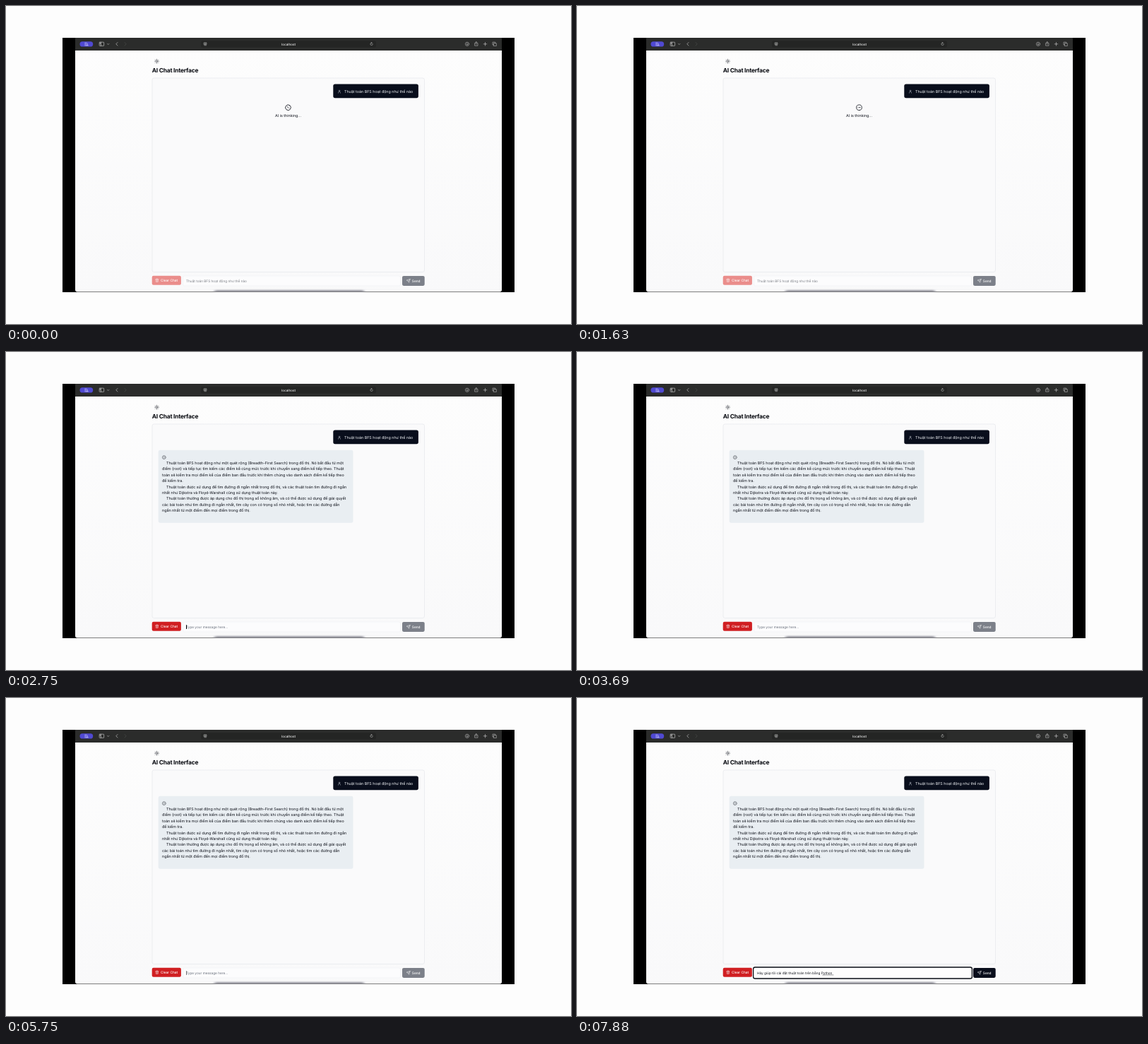
An HTML page that plays this animation: 800x450 px, repeating every 8000 ms.

```html
<!DOCTYPE html>
<html lang="vi">
<head>
<meta charset="utf-8">
<title>AI Chat Interface</title>
<style>
  html, body { margin: 0; width: 100%; height: 100%; overflow: hidden; background: #fdfdfd; }
  svg { display: block; width: 100%; height: 100%; }
  text {
    font-family: Inter, "Noto Sans", sans-serif;
    font-size: 5.35px; fill: #0b0e17;
    text-rendering: geometricPrecision; white-space: pre;
  }
  .small { font-size: 4.73px; }
  .button { font-size: 4.8px; font-weight: 500; fill: #fff; }
  .title { font-size: 8.4px; font-weight: 700; letter-spacing: -.025em; fill: #05070d; }
  .icon { fill: none; stroke-linecap: round; stroke-linejoin: round; }
</style>
</head>
<body>
<svg viewBox="0 0 800 450">
  <defs>
    <linearGradient id="page" x2="0" y2="1">
      <stop stop-color="#fdfdfd"/><stop offset="1" stop-color="#f9f9fa"/>
    </linearGradient>
    <filter id="blur" x="-10%" y="-200%" width="120%" height="500%"><feGaussianBlur stdDeviation="2.2 .8"/></filter>
    <clipPath id="window"><path d="M98 45H702V401.5Q702 404.5 699 404.5H101Q98 404.5 98 401.5Z"/></clipPath>
  </defs>

  <rect width="800" height="450" fill="#fdfdfd"/>
  <rect x="80" y="45" width="640" height="360"/>
  <g clip-path="url(#window)">
    <rect x="98" y="45" width="604" height="360" fill="url(#page)"/>
    <rect x="98" y="45" width="604" height="18" fill="#2b2c2b"/>
    <rect x="295" y="402.2" width="212" height="5" rx="2" fill="#85858f" filter="url(#blur)"/>
  </g>

  <g id="toolbar">
    <rect x="104.5" y="50.3" width="18.7" height="7.3" rx="3.65" fill="#5049d2"/>
    <rect x="276" y="49.3" width="248" height="9.2" rx="2.2" fill="#242524"/>
    <text x="400" y="55.6" text-anchor="middle" style="font-size:4.6px;font-weight:500;fill:#eee">localhost</text>
  </g>

  <g id="content">
    <text class="title" x="206.8" y="93.8">AI Chat Interface</text>
    <rect x="207" y="102" width="385.5" height="274.5" rx="2.5" fill="#fafafb" stroke="#e5e7eb" stroke-width=".7"/>
    <rect x="463.3" y="110.6" width="120.6" height="19.6" rx="2.7" fill="#090e1c"/>
    <text x="479" y="122.6" style="fill:#f4f6f9">Thuật toán BFS hoạt động như thế nào</text>
  </g>

  <g id="thinking">
    <g id="spinner"></g>
    <text x="399.5" y="156.8" text-anchor="middle">AI is thinking...</text>
  </g>

  <g id="reply">
    <rect x="215.7" y="138.8" width="275.8" height="103" rx="2.7" fill="#e9eef2"/>
  </g>

  <rect id="clear" x="206.7" y="381.8" width="41.2" height="13" rx="2.1"/>
  <text class="button" x="219" y="390.1">Clear Chat</text>
  <rect x="250.5" y="382" width="308" height="14" rx="2.1" fill="#fcfcfd" stroke="#eff0f3" stroke-width=".6"/>
  <rect id="ring" x="249.6" y="381" width="309.8" height="16" rx="2.6" fill="#fdfdfd" stroke="#090c14" stroke-width="1.3"/>
  <text id="entry" class="small" x="255" y="391"></text>
  <path id="underline" d="M347.3 391.9H363.4" stroke="#30333b" stroke-width=".5"/>
  <rect id="caret" y="386.2" width="1" height="5.8" fill="#05070c"/>
  <rect id="send" x="561" y="382" width="31.7" height="13.9" rx="2.1"/>
  <text class="button" x="574.8" y="390.7">Send</text>
  <g id="buttonIcons"></g>
</svg>

<script>
const LOOP = 8000, TICK = 62.5, ANSWER = 2750, TYPED = 7310;
const SPIN = 360 / 686, SPIN_START = 310;
const QUESTION = "Thuật toán BFS hoạt động như thế nào";
const FOLLOW_UP = "Hãy giúp tôi cài đặt thuật toán trên bằng Python";
const PLACEHOLDER = "Type your message here...";
const REPLY = [
  [227, "Thuật toán BFS hoạt động như một quét rộng (Breadth-First Search) trong đồ thị. Nó bắt đầu từ một"],
  [221, "điểm (root) và tiếp tục tìm kiếm các điểm kề cùng mức trước khi chuyển sang điểm kế tiếp theo. Thuật"],
  [221, "toán sẽ kiểm tra mọi điểm kề của điểm ban đầu trước khi thêm chúng vào danh sách điểm kế tiếp theo"],
  [221, "để kiểm tra."],
  [227, "Thuật toán được sử dụng để tìm đường đi ngắn nhất trong đồ thị, và các thuật toán tìm đường đi ngắn"],
  [221, "nhất như Dijkstra và Floyd-Warshall cũng sử dụng thuật toán này."],
  [227, "Thuật toán thường được áp dụng cho đồ thị trọng số không âm, và có thể được sử dụng để giải quyết"],
  [221, "các bài toán như tìm đường đi ngắn nhất, tìm cây con có trọng số nhỏ nhất, hoặc tìm các đường dẫn"],
  [221, "ngắn nhất từ một điểm đến mọi điểm trong đồ thị."],
];
// The caret fades between each pair of times, alternately out and in.
const FADES = [
  [2940, 3060], [3250, 3380], [3570, 3690], [3690, 3880], [4250, 4440], [4570, 4750],
  [4940, 5060], [5250, 5440], [5570, 5690], [5690, 5810], [6250, 6440], [6630, 6810],
  [6940, 7060], [7250, 7310], [7630, 7880],
];

const $ = id => document.getElementById(id);

function add(parent, name, attrs, text = "") {
  const node = document.createElementNS("http://www.w3.org/2000/svg", name);
  for (const key in attrs) node.setAttribute(key, attrs[key]);
  node.textContent = text;
  parent.append(node);
  return node;
}

// Icons are drawn on a 24-unit grid centred on x, y.
function icon(parent, d, x, y, size, stroke, width = 2) {
  const k = size / 24;
  add(parent, "path", {
    class: "icon", d, stroke, "stroke-width": width,
    transform: `translate(${x - size / 2} ${y - size / 2}) scale(${k})`,
  });
}

const ALERT = "M22 12A10 10 0 1 1 2 12A10 10 0 1 1 22 12M12 8V12M12 16H12.01";
const SUN = "M16 12A4 4 0 1 1 8 12A4 4 0 1 1 16 12M12 2V4M12 20V22M5 5L6.4 6.4M17.6 17.6L19 19M2 12H4M20 12H22M6.4 17.6L5 19M19 5L17.6 6.4";
const USER = "M16 7A4 4 0 1 1 8 7A4 4 0 1 1 16 7M5 22V20A7 7 0 0 1 19 20V22";
const TRASH = "M3 6H21M19 6V20Q19 22 17 22H7Q5 22 5 20V6M8 6V4Q8 2 10 2H14Q16 2 16 4V6M10 11V17M14 11V17";
const PLANE = "M22 2L15 22L11 13L2 9ZM22 2L11 13";

const bar = $("toolbar"), light = "#c9c9c9";
icon(bar, "M4 5H13M4 12H10M4 19H13M17 8V18M14 19H22", 113.8, 54, 6.2, "#e9e8ff", 2.4);
icon(bar, "M4 4H20Q22 4 22 6V18Q22 20 20 20H4Q2 20 2 18V6Q2 4 4 4M9 4V20M4.5 8H6.5M4.5 12H6.5", 135.4, 53.8, 7.8, light);
icon(bar, "M4 8L12 16L20 8", 144.7, 54, 3.6, light, 4);
icon(bar, "M16 3L7 12L16 21", 157, 53.8, 6, light, 2.6);
icon(bar, "M8 3L17 12L8 21", 169, 53.8, 6, "#505150", 2.4);
icon(bar, "M4 3H20V16H4ZM7 8H17M7 12H14M6 21H18", 282.2, 53.8, 5.2, light, 2.4);
icon(bar, "M20 12A8 8 0 1 1 14 4.3M10 1L15 4.5L11 9", 517.6, 53.8, 5.2, light, 2.4);
icon(bar, "M22 12A10 10 0 1 1 2 12A10 10 0 1 1 22 12M12 7V16M8 13L12 17L16 13", 653, 53.8, 6.4, light);
icon(bar, "M8 9H4V22H20V9H16M12 15V2M8 6L12 2L16 6", 665.8, 53.4, 6.6, light);
icon(bar, "M12 3V21M3 12H21", 678.5, 53.8, 6, light, 2.6);
icon(bar, "M8 8H22V22H8ZM16 8V2H2V16H8", 691.7, 53.8, 6.4, light);

icon($("content"), SUN, 213.5, 78.2, 7, "#11141c");
icon($("content"), USER, 472, 121, 5.2, "#dfe3ea");
icon($("spinner"), ALERT, 0, 0, 9.2, "#0b0e17");
icon($("reply"), ALERT, 223.8, 149.1, 5.8, "#11151f");
icon($("buttonIcons"), TRASH, 213.8, 388.2, 5.4, "#fff");
icon($("buttonIcons"), PLANE, 569.8, 389, 5.6, "#fff");
REPLY.forEach(([x, line], i) => add($("reply"), "text", { x, y: 158.9 + 8.4 * i }, line));

const clamp = v => Math.min(1, Math.max(0, v));
const show = (id, visible) => $(id).setAttribute("visibility", visible ? "visible" : "hidden");

function caretOpacity(t) {
  return FADES.reduce((level, [from, to], i) => {
    const p = clamp((t - from) / (to - from));
    return level + (i % 2 ? p : -p);
  }, 1);
}

function mix(a, b, p) {
  return `rgb(${a.map((v, i) => Math.round(v + (b[i] - v) * p))})`;
}

function render(time) {
  const t = Math.round(Math.floor((time + 3) / TICK) * TICK / 10 + .01) * 10;
  const answered = t >= ANSWER, typed = t >= TYPED;
  const angle = SPIN_START + t * SPIN;

  $("spinner").setAttribute("transform", `translate(399.5 143.7) rotate(${angle})`);
  show("thinking", !answered);
  show("reply", answered);
  show("ring", typed);
  show("underline", typed);

  $("entry").textContent = typed ? FOLLOW_UP : answered ? PLACEHOLDER : QUESTION;
  $("entry").style.fill = typed ? "#10131b" : answered ? "#686f7b" : "#7b7e85";
  $("clear").setAttribute("fill", answered ? "#d01f22" : "#ea8d8b");
  $("send").setAttribute("fill", mix([124, 128, 137], [9, 14, 28], clamp((t - TYPED + 60) / 190)));
  $("caret").setAttribute("x", typed ? 363.6 : 255);
  $("caret").setAttribute("opacity", answered ? caretOpacity(t) : 0);
}

const start = performance.now();
function frame() {
  render((performance.now() - start) % LOOP);
  requestAnimationFrame(frame);
}
frame();
</script>
</body>
</html>
```
